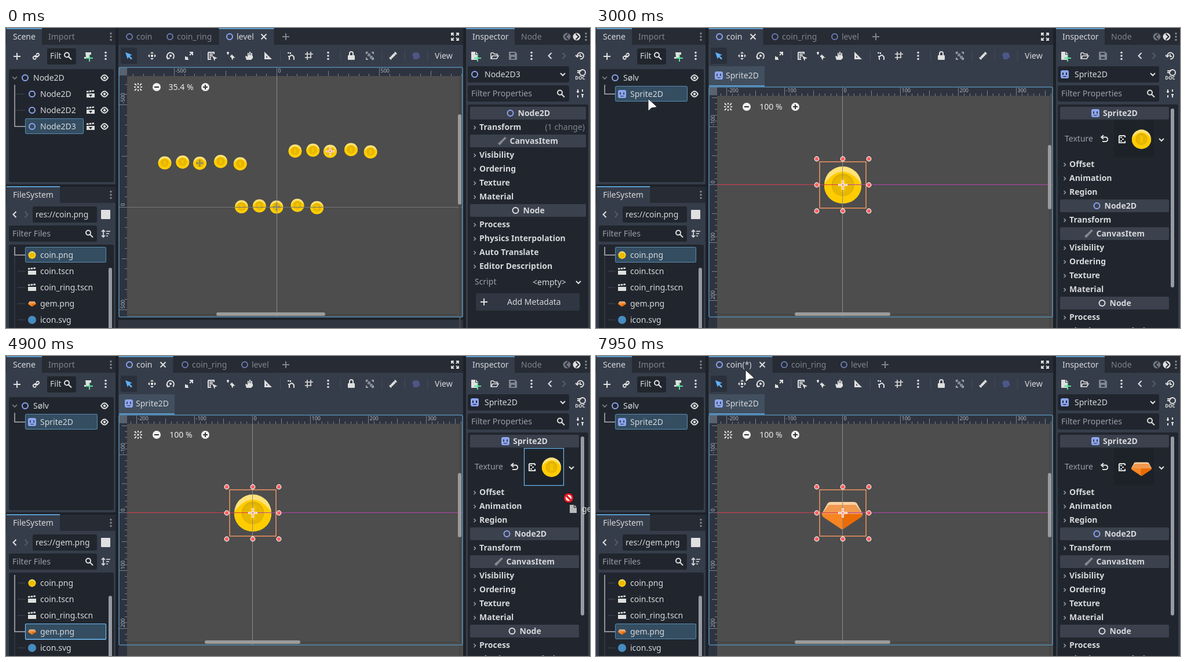
Write an HTML page that moves like this. It is 1008x518 px and loops after 8 s.

```html
<!DOCTYPE html>
<html lang="en">
<head>
<meta charset="utf-8">
<title>Scene editor</title>
<style>
html, body { margin: 0; width: 100%; height: 100%; overflow: hidden; background: #1d2229; }
svg { display: block; width: 100%; height: 100%; }
text { font-family: "Noto Sans", "Open Sans", sans-serif; font-size: 14px; white-space: pre; }
</style>
</head>
<body>
<svg id="stage" viewBox="0 0 1008 518"></svg>
<script>
const FG = '#d6d8db', ICON = '#e0e0e0', DIM = '#7f858e', FAINT = '#555c68';
const PANEL = '#363d4a', DARK = '#21262e', BAR = '#262b34', ACCENT = '#5b9ccf', FOCUS = '#6fb9f4', NODE = '#8da5f3';

// Drawing helpers
const rect = (x, y, w, h, fill, r = 0, extra = '') =>
  `<rect x="${x}" y="${y}" width="${w}" height="${h}" rx="${r}" fill="${fill}" ${extra}/>`;
const frame = (x, y, w, h, color, width = 1, r = 2) =>
  rect(x, y, w, h, 'none', r, `stroke="${color}" stroke-width="${width}"`);
const circle = (x, y, r, fill, extra = '') => `<circle cx="${x}" cy="${y}" r="${r}" fill="${fill}" ${extra}/>`;
const text = (x, y, s, fill = FG, extra = '') =>
  `<text x="${x}" y="${y}" fill="${fill}" ${extra}>${s.replace(/</g, '&lt;')}</text>`;
const bold = (x, y, s, extra = '') => text(x, y, s, FG, 'font-weight="700" ' + extra);
const line = (x, y, d, color = ICON, width = 2, extra = '') =>
  `<path transform="translate(${x} ${y})" d="${d}" fill="none" stroke="${color}" stroke-width="${width}" ${extra}/>`;
const solid = (x, y, d, color = ICON) =>
  `<path transform="translate(${x} ${y})" d="${d}" fill="${color}" fill-rule="evenodd"/>`;
const group = (id, body, extra = '') => `<g id="${id}" ${extra}>${body}</g>`;
const at = (x, y, s, body) => `<g transform="translate(${x} ${y}) scale(${s})">${body}</g>`;

// Icons
const ring = (x, y, color = NODE) => circle(x, y, 5, 'none', `stroke="${color}" stroke-width="2"`);
const plus = (x, y, color = ICON) => line(x, y, 'M-6 0H6M0-6V6', color);
const cross = (x, y) => line(x, y, 'M-4.5-4.5 4.5 4.5M4.5-4.5-4.5 4.5');
const dots = (x, y, color = ICON) => line(x, y, 'M0-5.5h.01M0 0h.01M0 5.5h.01', color, 3.6, 'stroke-linecap="round"');
const search = (x, y) => line(x, y, 'M2-1.5a4 4 0 1 0-8 0a4 4 0 1 0 8 0M1 1.5 6 6.5');
const left = (x, y, c) => line(x, y, 'M2.5-5-2.5 0 2.5 5', c);
const right = (x, y, c) => line(x, y, 'M-2.5-5 2.5 0-2.5 5', c);
const down = (x, y, c) => line(x, y, 'M-4-2 0 2 4-2', c);
const fold = (x, y) => line(x, y, 'M-1.5-3 1.5 0-1.5 3', '#9a9ea6', 1.5);
const eye = (x, y) => line(x, y, 'M-6 0Q0-9.5 6 0Q0 9.5-6 0Z') + circle(x, y, 2.2, ICON);
const clapper = (x, y, hole = '') => solid(x, y, 'M-7-1H7V6H-7Z' + hole) + line(x, y, 'M-7-4 7-5.5', ICON, 2.6, 'stroke-dasharray="3.5 1.2"');
const sprite = (x, y) => solid(x, y, 'M-4-7H4Q7-7 7-4V4Q7 7 4 7H-4Q-7 7-7 4V-4Q-7-7-4-7ZM-4-3V1H-2V-3ZM2-3V1H4V-3ZM-4 3Q0 6 4 3Z', NODE);
const page = (x, y, color = ICON) => solid(x, y, 'M-6-7H1V-2H6V7H-6ZM2-7 6-3H2Z', color);
const brush = (x, y) => line(x, y, 'M6-6-1 1', '#85898f', 3.6) + line(x, y, 'M-1 1-6 6', '#85898f', 4.5);

const COIN = circle(0, 0, 32, '#ffe27a') + '<path d="M-31.6-5Q0-48 31.6-5A32 32 0 1 1-31.6-5Z" transform="translate(0 2) scale(1 .94)" fill="#fc0"/>' +
  circle(0, 0, 19.5, '#dfb000') + circle(0, 1.5, 17, '#e8b800') + rect(-4.5, -11, 9, 23, '#f4c400', 2);
const GEM = '<path d="M-35 0-25-18Q-23-20-20-20H20Q23-20 25-18L35 0Z" fill="#fbd0a2"/><path d="M-35 0-23-15H23L35 0Q36 3 33 5H-33Q-36 3-35 0Z" fill="#f0994f"/>' +
  '<path d="M-35 1H0V28L-33 6Z" fill="#f68522"/><path d="M35 1H0V28L33 6Z" fill="#eb6b04"/>';

const field = (x, y, w) => rect(x, y, w, 28, DARK, 3);
const selection = (x, y, w) => rect(x, y, w, 27, '#344d61', 2) + frame(x + .5, y + .5, w - 1, 26, '#5a8db2');
const dockTab = (x, y, w, label) => rect(x, y, w, 29, PANEL) + rect(x, y - 1, w, 2, ACCENT) + text(x + 11, y + 19, label);

function shell() {
  let s = rect(0, 0, 189, 29, BAR) + rect(0, 29, 189, 241, PANEL) + rect(5, 71, 181, 195, DARK, 3);
  s += dockTab(1, 1, 61, 'Scene') + text(73, 20, 'Import', DIM) + dots(181, 15, DIM);
  s += plus(19, 49) + line(52, 49, 'M0-3 2-5Q5-6 5-2L2 1Q0 2-2 0M0 3-2 5Q-6 5-5 1L-2-1Q0-2 2 0', ICON, 1.9);
  s += field(71, 35, 50) + text(76, 53, 'Filt') + search(107, 48);
  s += solid(141, 48, 'M-4-6H6V-2H3V5H-6V2H-3Z') + plus(144, 52, '#5fdf9a') + dots(172, 48);
  s += rect(0, 274, 189, 28, BAR) + rect(0, 302, 189, 216, PANEL) + dockTab(1, 274, 92, 'FileSystem') + dots(181, 288, DIM);
  s += left(15, 322) + right(35, 322, FAINT) + field(46, 308, 111) + rect(164, 314, 16, 16, ICON, 1);
  s += field(5, 341, 152) + text(11, 360, 'Filter Files', '#9a9fa7') + search(144, 355);
  s += line(172, 355, 'M-4-6V6M-7-3-4-6-1-3M-7 3-4 6-1 3M1-4H8M1 0H6M1 4H4', ICON, 1.7) + rect(5, 374, 181, 150, DARK, 3);

  s += rect(194, 0, 595, 29, BAR) + rect(194, 29, 595, 73, PANEL) + rect(194, 504, 595, 14, '#303641');
  s += line(775, 15, 'M-6-2V-6H-2M2-6H6V-2M6 2V6H2M-2 6H-6V2M-6-6-2-2M6-6 2-2M6 6 2 2M-6 6-2 2', ICON, 1.8);
  s += rect(198, 34, 28, 28, '#2a303b', 3) + solid(212, 48, 'M-6-6 6-1.5 1.5 0 6 4.5 4 6.5-.5 2-2 6Z', '#5fb2ff');
  s += solid(252, 48, 'M0-7 3-4H-3ZM0 7 3 4H-3ZM-7 0-4-3V3ZM7 0 4-3V3ZM-2-2H2V2H-2Z');
  s += line(284, 48, 'M-5 4A6 6 0 1 1 4 5M-7 1-5 5-1 4') + circle(284, 48, 2, ICON);
  s += line(316, 48, 'M1-6H6V-1M6-6 1-1M-6 1V6H-1') + rect(310, 50, 4, 4, ICON);
  s += line(355, 48, 'M-6-6H4V-3M-6-6V6H-1M-4-3H2M-4 0H2M-4 3H-1') + solid(360, 52, 'M-4-4 5 0 1 1 0 5Z');
  s += line(388, 48, 'M-5-7V-2M-7-5H-3M-1 1H5M2-2V4') + solid(390, 50, 'M-3-3 6 1 2 2 1 6Z');
  s += solid(420, 48, 'M-5 7-7 1-5 0-3 2V-5H-1V-1H0V-7H2V-1H3V-5H5V0H6V4L3 7Z');
  s += solid(452, 48, 'M-6-7 7 6H-6ZM-3 0V3H0Z');
  s += line(492, 48, 'M-6-5h3M-5 1h2M-1-6v3M-3 7V2Q1-4 5 2V7') + line(523, 48, 'M-3-7V7M3-7V4M-7-3H7M-7 3H4', ICON, 1.6) + dots(556, 48);
  s += line(596, 48, 'M-3-1V-4A3 3 0 0 1 3-4V-1') + rect(590, 47, 12, 8, ICON, 1);
  s += line(628, 48, 'M-6-3V-6H-3M3-6H6V-3M-6 3V6H-3M3 6H6V3', '#a0a4aa') + rect(624, 44, 5, 5, DIM) + rect(628, 48, 5, 5, DIM);
  s += line(668, 48, 'M-3 3 3-3', ICON, 4) + solid(668, 48, 'M-7 3-4 2-2 4-3 7-5 6ZM7-3 4-2 2-4 3-7 5-6Z');
  s += solid(708, 48, 'M-6-3Q-4-8-1-5Q3-8 5-3L6-1V5L3 3V6H-5V2L-7 0Z', '#4c5788') + text(740, 53, 'View');
  for (const x of [336, 473, 577, 648, 688, 727]) s += rect(x, 38, 1, 20, '#444b58');

  s += rect(794, 0, 214, 29, BAR) + rect(794, 29, 214, 489, PANEL) + dockTab(794, 1, 84, 'Inspector') + text(889, 20, 'Node', DIM);
  s += circle(968, 15, 6.5, '#70757e') + left(968, 15, BAR) + circle(985, 15, 6.5, ICON) + right(986, 15, BAR) + dots(1001, 15, DIM);
  s += page(809, 48) + plus(814, 52, '#5fdf9a') + line(843, 48, 'M-6-5H-2L0-3H5V0M-6-5V5H4L7 0H-3L-6 5', ICON, 1.6);
  s += solid(875, 48, 'M-7-7H4L7-4V7H-7ZM-4-5V-2H3V-5ZM-3 2V5H3V2Z', DIM) + dots(907, 48) + left(939, 48) + right(963, 48, FAINT);
  s += line(991, 48, 'M-5 0A5.5 5.5 0 1 1 0 5.5M-8-1-5 2-2-1M0-3V1H3', ICON, 1.8);
  s += field(797, 66, 175) + down(961, 80) + line(991, 77, 'M-5-3H2M-5 0H0', ICON, 1.8) + ring(995, 77, ICON) +
    text(991, 89, 'DOC', ICON, 'text-anchor="middle" font-weight="700" style="font-size:8px"');
  s += field(797, 99, 175) + text(803, 118, 'Filter Properties', '#9a9fa7') + search(958, 113);
  s += line(991, 113, 'M-4-7V-1M-4 3V7M-6-3H-2M4-7V-3M4 1V7M2 2H6') + rect(797, 132, 208, 390, DARK, 3);
  return s;
}

const TAB_WIDTH = { 'coin': 70, 'coin(*)': 86, 'coin_ring': 103, 'level': 71 };
function tabs(names, active) {
  let x = 213, s = '';
  names.forEach((name, i) => {
    const on = i === active, w = TAB_WIDTH[name] + (on ? 26 : 0);
    if (on) s += rect(x - 18.5, 1, w - 2, 28, PANEL) + rect(x - 18.5, 0, w - 2, 2, ACCENT) + cross(x + w - 38, 15);
    s += ring(x, 15, on ? NODE : '#6a7ab0') + text(x + 12, 20, name, on ? FG : DIM);
    x += w;
  });
  return s + plus(x, 15, DIM);
}

function ruler(top, ox, oy, step, unit) {
  let s = rect(195, top, 594, 15, '#2e343f') + rect(195, top, 14, 431, '#2e343f') + rect(195, top, 14, 14, '#59636f');
  for (let i = -40; i <= 40; i++) {
    const x = Math.round(ox + i * step / 10) + .5, y = Math.round(oy + i * step / 10) + .5;
    const size = i % 10 === 0 ? 14 : i % 5 === 0 ? 9 : 4;
    const label = i % 10 === 0 && String(i / 10 * unit), small = 'style="font-size:9px"';
    if (x > 210 && x < 788) {
      s += line(x, top + 15, `M0 0V${-size}`, '#7b828c', 1);
      if (label) s += text(x + 2, top + 9, label, '#b4b8be', small);
    }
    if (y > top + 15 && y < 499) {
      s += line(209, y, `M0 0H${-size}`, '#7b828c', 1);
      if (label) s += `<g transform="translate(205 ${y - 2}) rotate(-90)">${text(0, 0, label, '#b4b8be', small)}</g>`;
    }
  }
  return s;
}

function viewport(top, ox, oy, step, unit, zoom, h, v, content) {
  const y = top + 34;
  let s = rect(195, top, 594, 431, '#4d4d4d') + content + ruler(top, ox, oy, step, unit);
  s += rect(210, 493, 570, 3, '#464646') + rect(782, top + 16, 3, 475, '#464646');
  s += rect(h[0], 491, h[1] - h[0], 6, '#9b9b9b', 3) + rect(780, v[0], 6, v[1] - v[0], '#9b9b9b', 3);
  s += line(228, y, 'M-6-6-3-3M6-6 3-3M-6 6-3 3M6 6 3 3M0-7V-4M0 7V4M-7 0H-4M7 0H4') + circle(228, y, 1.8, ICON);
  s += circle(260, y, 7, '#f0f0f0') + line(260, y, 'M-4 0H4', '#333') + circle(344, y, 7, '#f0f0f0') + line(344, y, 'M-4 0H4M0-4V4', '#333');
  return s + text(302, y + 5, zoom, '#eee', 'text-anchor="middle"');
}

const pivot = (x, y, a, b, s = 1) => at(x, y, s, line(0, 0, 'M-8 0H-2M2 0H8M0-8V-2M0 2V8', a, 3.6) +
  line(0, 0, 'M-7 0H7M0-7V7', b, 1.2) + circle(0, 0, 2.2, 'none', `stroke="${a}"`));

function levelCoins() {
  const offsets = [[-60.5, -.5], [-29.7, -2], [0, 0], [36, -3], [69.7, 1]];
  return [[334.5, 233.3], [467, 309], [559.5, 212.8]].map(([x, y], i) =>
    offsets.map(([dx, dy]) => at(x + dx, y + dy, .355, COIN)).join('') +
    (i === 2 ? pivot(x, y, '#fff', '#f55', .9) : pivot(x, y, '#a99a55', '#77704a', .8))).join('');
}

const inspectorRows = (rows, width) => rows.map(([y, name, icon]) => icon
  ? rect(801, y - 11, width, 22, '#3b414d', 2) + category(y, name, icon, 801 + width / 2)
  : fold(809, y + 1) + bold(817, y + 5, name)).join('');
const NAME_WIDTH = { Node2D: 55, CanvasItem: 83, Node: 37, Sprite2D: 60 };
function category(y, name, icon, mid) {
  const x = mid + 10 - NAME_WIDTH[name] / 2;
  return icon(x - 13, y) + bold(x, y + 5, name);
}
const white = (x, y) => ring(x, y, ICON);
const canvasRows = y => [[y, 'CanvasItem', brush], [y + 24, 'Visibility'], [y + 48, 'Ordering'], [y + 72, 'Texture'],
  [y + 96, 'Material'], [y + 120, 'Node', white], [y + 144, 'Process'], [y + 168, 'Physics Interpolation']];

function levelScene() {
  let s = line(15, 86, 'M-4-2 0 2 4-2', DIM, 1.6) + ring(33, 86) + text(47, 91, 'Node2D') + eye(170, 86);
  s += line(15, 98, 'M0 16H18M0 44H18', '#414751', 1) + selection(33, 156, 101) + line(15, 98, 'M0 0V72H18', '#aeb2b8', 1.5);
  ['Node2D', 'Node2D2', 'Node2D3'].forEach((name, i) => {
    const y = 114 + 28 * i;
    s += ring(45, y) + text(59, y + 5, name) + clapper(146, y, 'M-3 1H3L0 5Z') + eye(170, y);
  });
  s += tabs(['coin', 'coin_ring', 'level'], 2);
  s += viewport(68, 467, 309, 177, 500, '35.4 %', [363, 551], [149, 305], levelCoins() +
    line(467.5, 68, 'M0 0V431', '#8d8d8d', 1) + line(195, 309.5, 'M0 0H593', '#777', 1)) + frame(195, 68, 593, 431, '#5689ae', 1.6);
  s += ring(809, 80) + text(826, 85, 'Node2D3');
  s += inspectorRows([[147, 'Node2D', ring], [171, 'Transform'], ...canvasRows(195), [387, 'Auto Translate'], [411, 'Editor Description']], 200);
  s += text(999, 176, '(1 change)', DIM, 'text-anchor="end"') + text(809, 443, 'Script', '#9a9fa7') + text(909, 444, '<empty>') + down(988, 439);
  return s + rect(811, 458, 179, 30, '#303743', 3) + plus(825, 473) + text(865, 478, 'Add Metadata');
}

function coinScene() {
  let s = line(15, 86, 'M-4-2 0 2 4-2', DIM, 1.6) + ring(33, 86) + text(47, 91, 'Sølv') + eye(170, 86) + eye(170, 114);
  s += selection(33, 100, 125) + line(15, 98, 'M0 0V16H18', '#aeb2b8', 1.5) + sprite(45, 114) + text(59, 119, 'Sprite2D');
  s += group('tabsSaved', tabs(['coin', 'coin_ring', 'level'], 0)) + group('tabsEdited', tabs(['coin(*)', 'coin_ring', 'level'], 0));
  s += rect(195, 66, 96, 35, '#414f5f') + rect(195, 99, 96, 2, ACCENT) + sprite(212, 82) + text(224, 87, 'Sprite2D');
  let body = group('coinSprite', at(426, 271, 1, COIN)) + group('gemSprite', at(425, 272, 1, GEM));
  body += line(425.5, 102, 'M0 0V397', '#8d8d8d', 1) + line(195, 270.5, 'M0 0H230', '#d83c50', 1) + line(425, 270.5, 'M0 0H363', '#b045ad', 1);
  body += frame(386, 231, 80, 80, '#e8935f', 1.6, 0);
  for (const x of [381, 426, 471]) for (const y of [226, 271, 316])
    if (x !== 426 || y !== 271) body += circle(x, y, 3.8, '#ff6060', 'stroke="#fff" stroke-width="1.2"');
  body += pivot(426, 271, '#fff', '#f08068');
  s += viewport(102, 425, 270, 100, 100, '100 %', [343, 508], [202, 313], body);
  s += group('canvasFocus', frame(195, 102, 593, 397, '#5689ae', 1.6)) + group('tabFocus', frame(195, 1, 94, 27, FOCUS, 2));
  s += sprite(809, 80) + text(826, 85, 'Sprite2D');
  s += inspectorRows([[147, 'Sprite2D', sprite], [235, 'Offset'], [259, 'Animation'], [283, 'Region'], [307, 'Node2D', ring],
    [331, 'Transform'], ...canvasRows(355)], 188) + rect(992, 139, 6, 309, '#969ba3', 3);
  s += text(809, 196, 'Texture', '#9a9fa7') + line(878, 192, 'M-4 4H2A3.8 3.8 0 0 0 2-3.5H-5M-2-7-6-3.5-2 0', ICON, 1.8);
  s += rect(894, 160, 69, 63, '#1d2229') + line(908, 192, 'M-5-6H5M-5-6V6H5V3M5-6V-3M-3-3h3M0 0h3M-3 3h3', ICON, 2.2) + down(976, 193);
  return s + group('coinThumb', at(941.5, 192, .52, COIN)) + group('gemThumb', at(941.5, 193.5, .5, GEM)) +
    group('dropTarget', frame(894.5, 159.5, 68, 64, FOCUS, 1.2, 0));
}

const FILES = ['coin.png', 'coin.tscn', 'coin_ring.tscn', 'gem.png', 'icon.svg'];
function files(selected) {
  const y = 392 + 28 * selected;
  let s = text(51, 327, 'res://' + FILES[selected]) + line(15, 378, 'M0 0V140M5 14H18M5 42H18M5 70H18M5 98H18M5 126H18', '#414751', 1);
  s += selection(33, y - 14, 140) + line(15, 378, `M0 0V${y - 378}H18`, '#aeb2b8', 1.5);
  FILES.forEach((name, i) => s += text(59, 397 + 28 * i, name));
  s += at(45, 392, .2, COIN) + clapper(45, 420) + clapper(45, 448) + at(45, 476, .19, GEM) + circle(45, 504, 7, '#478cbf');
  return s + rect(177, 414, 6, 108, '#969ba3', 3);
}

const HINTS = ['Drag and drop to add as sibling of selected node (except when root is selected).', 'Hold Shift when dropping to add as child of selected node.',
  'Hold Alt when dropping to add as child of root node.', 'Hold Alt + Shift when dropping to add as different node type.'];
const shade = 'style="text-shadow:1px 1px 1px #000"';
const dropHints = () => text(218, 173, 'Adding Sprite2D...', '#ffe07a', shade) + HINTS.map((s, i) => text(218, 203 + 18 * i, s, '#989898', shade)).join('') +
  '<g clip-path="url(#canvasClip)"><g id="ghost" opacity=".7">' + GEM + '</g></g>' +
  `<text id="place" x="214" y="480" fill="#fff" ${shade}></text>`;

const pointers = group('arrow', '<path d="M0 0V19.5Q.3 21 1.6 20L6 16 14 14.8Q15.2 14.2 14.3 13.2Z" fill="#fff" stroke="#222" stroke-width="1"/>') +
  group('fist', '<path d="M-6-3Q-6-5-4-5Q-4-7-2-6Q0-8 2-6Q4-7 4.5-5Q7-5 6.5-2V2Q6 4 5 7H-4Q-4 4-6.5 1Z" fill="#fff" stroke="#111" stroke-width="1"/>' +
    line(0, 0, 'M-2-5V-2M1-5V-2M4-4V-2', '#555', .8)) +
  group('denied', circle(0, 0, 8.8, '#e01b24', 'stroke="#111" stroke-width="1"') + circle(0, 0, 5.2, '#fff') + line(0, 0, 'M-4-4 4 4', '#e01b24', 3.4));

document.getElementById('stage').innerHTML = '<clipPath id="canvasClip"><rect x="209" y="117" width="579" height="381"/></clipPath>' +
  shell() + group('level', levelScene()) + group('coin', coinScene()) + group('filesCoin', files(0)) + group('filesGem', files(3)) +
  group('fileFocus', frame(33.5, 462.5, 139, 27, FOCUS, 1.2)) + group('hints', dropHints()) +
  group('drag', page(0, 0) + text(15, 5, 'gem.png', '#fff'), 'opacity=".8"') + group('pointer', pointers);

// Pointer path: time, x, y
const PATH = [[100, 575, 225], [250, 545, 205], [550, 350, 85], [900, 236, 12], [2150, 236, 12], [2400, 231, 65], [2600, 205, 112],
  [2800, 135, 128], [3000, 90, 122], [3100, 91, 119], [3250, 91, 119], [3950, 72, 474], [4150, 72, 474], [4250, 115, 473],
  [4350, 279, 464], [4400, 428, 451], [4600, 755, 380], [4850, 969, 250], [4900, 971, 245], [5450, 924, 193], [6050, 924, 193],
  [6950, 687, 233], [7700, 258, 25], [7850, 258, 25], [7900, 258, 24]];

const secant = (i, k) => PATH[i] && PATH[i + 1] ? (PATH[i + 1][k] - PATH[i][k]) / (PATH[i + 1][0] - PATH[i][0]) : 0;
function slope(i, k) {
  const a = secant(i - 1, k), b = secant(i, k);
  return a * b > 0 ? 2 * a * b / (a + b) : 0;
}
function pointerAt(t) {
  const last = PATH.length - 1, i = PATH.findIndex((p, n) => n < last && t < PATH[n + 1][0]);
  if (i < 0) return PATH[last].slice(1);
  const p = PATH[i], q = PATH[i + 1], d = q[0] - p[0], u = Math.max(0, (t - p[0]) / d), v = 1 - u;
  return [1, 2].map(k => Math.round((1 + 2 * u) * v * v * p[k] + u * v * v * d * slope(i, k) +
    u * u * (3 - 2 * u) * q[k] - u * u * v * d * slope(i + 1, k)));
}

const $ = id => document.getElementById(id);
const show = (id, on) => $(id).style.display = on ? '' : 'none';
const move = (id, x, y) => $(id).setAttribute('transform', `translate(${x} ${y})`);

function render(t) {
  const [x, y] = pointerAt(t), [dx, dy] = pointerAt(t - 50);
  const edited = t >= 5700, opened = t >= 1700, picked = t >= 4150, dragging = t >= 4200 && !edited;
  const overCanvas = (px, py) => px > 195 && px < 789 && py > 102 && py < 499;
  const overTexture = x > 894 && x < 963 && y > 159 && y < 224;
  const canDrop = overCanvas(x, y) || overTexture;
  const hinting = dragging && overCanvas(dx, dy);
  const visible = {
    level: !opened, coin: opened, filesCoin: !picked, filesGem: picked, fileFocus: picked && !edited,
    tabFocus: t < 2550, canvasFocus: t >= 2550, tabsSaved: !edited, tabsEdited: edited,
    coinSprite: !edited, gemSprite: edited, coinThumb: !edited, gemThumb: edited,
    dropTarget: dragging, drag: dragging, hints: hinting,
    pointer: t >= 100, arrow: !dragging, fist: dragging && canDrop, denied: dragging && !canDrop
  };
  for (const id in visible) show(id, visible[id]);
  move('pointer', x, y);
  move('drag', dx + 10, dy + 14);
  move('ghost', dx, dy + 2);
  $('place').textContent = `Instantiating: (${dx - 425}, ${dy - 270}) px`;
}

function tick() {
  render(Math.floor(performance.now() % 8000 / 50) * 50);
  requestAnimationFrame(tick);
}
tick();
</script>
</body>
</html>
```
